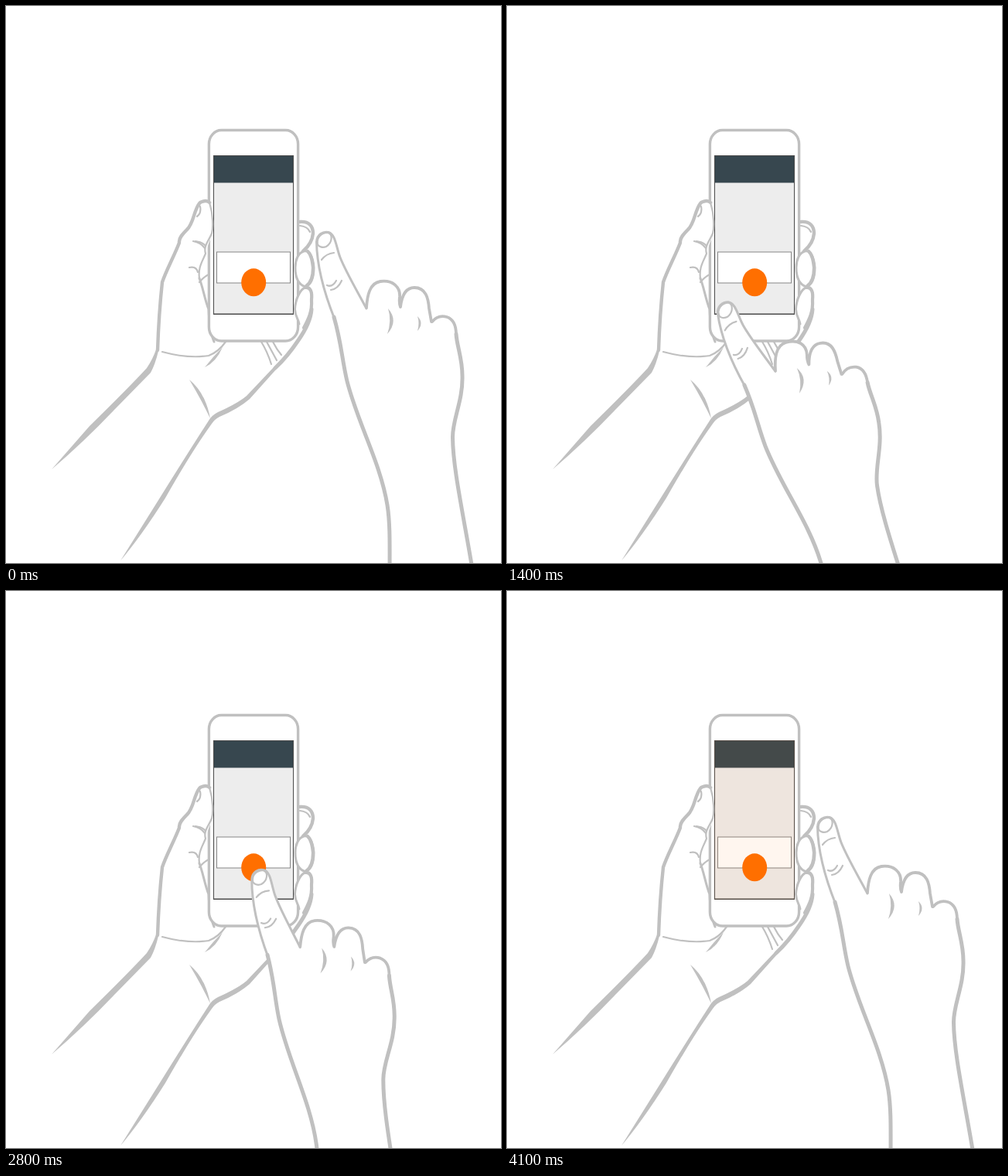
An HTML page for the animation above (4200 ms loop, 640 px wide and 720 px high).

```html
<!DOCTYPE html>
<html lang="en">
<head>
<meta charset="utf-8">
<title>Swipe and tap</title>
<style>
  html, body { margin: 0; width: 100%; height: 100%; overflow: hidden; background: #fff; }
  svg { display: block; width: 100vw; height: 100vh; }
  .line { fill: none; stroke: #c0c0c0; stroke-width: 3; stroke-linecap: round; stroke-linejoin: round; }
  .line .thin { stroke-width: 2.2; }
  .line .bold { stroke-width: 5; }
  .line .skin { fill: #fff; }
  .line .taper { fill: #c0c0c0; stroke: none; }
  .line .mask { fill: #fff; stroke: none; }
</style>
</head>
<body>
<svg viewBox="0 0 640 720">
  <defs>
    <clipPath id="screen"><rect x="268" y="193" width="104" height="206"/></clipPath>
    <g id="page">
      <rect x="268.5" y="193.5" width="103" height="205" fill="#ededed" stroke="#4a4a4a"/>
      <rect x="269" y="194" width="102" height="34.5" fill="#37474f"/>
      <rect x="272.5" y="318" width="95" height="40" fill="#fff" stroke="#858585"/>
      <ellipse cx="320.2" cy="357.3" rx="16" ry="18" fill="#ff6f00"/>
    </g>
  </defs>

  <!-- holding arm and palm -->
  <g class="line">
    <path class="taper" d="M59 599 L108 543 Q160 492 182 468 Q190 456 194 444 L197 446 Q193 463 187 474 L140 522 Q100 564 59 599Z"/>
    <path class="taper" d="M148 717 L200 634 Q240 570 262 536 Q266 529 274 525 Q299 514 311 504 L346 467 L349 470 L315 508 Q300 521 276 531 Q270 534 266 540 Q240 576 206 636 Q175 685 148 717Z"/>
    <path class="thin" d="M202 447 Q235 456 262 452 Q275 447 284 434"/>
    <path class="taper" d="M280 441 Q272 460 257 467 Q267 454 280 441Z"/>
    <path class="taper" d="M237 483 Q258 500 264 533 Q252 508 237 483Z"/>
    <path class="thin" d="M330 434 Q338 447 343 463 M337 434 Q344 447 350 458 M345 434 Q350 444 356 451"/>
    <path d="M250 352 C255 365 257 380 262 392 Q263 420 269 434"/>
    <path class="bold" d="M395 392 C394 408 385 422 378 432 Q364 453 348 468"/>
  </g>

  <!-- phone -->
  <rect x="262.4" y="160.5" width="115.2" height="272.5" rx="16" ry="18" fill="#fff" stroke="#c0c0c0" stroke-width="3.4"/>
  <g clip-path="url(#screen)">
    <rect x="268" y="193" width="104" height="206" fill="#444"/>
    <use id="current" href="#page"/>
    <use id="next" href="#page"/>
    <path d="M268 398.3H372" stroke="#4a4a4a" stroke-width="1.4"/>
    <ellipse id="ripple" cx="320.2" cy="357.3" fill="#ff6f00"/>
  </g>

  <!-- thumb and fingers around the phone -->
  <g class="line">
    <path class="mask" d="M251 254 Q258 249 263 254 Q268 275 266 296 L258 318 L240 300Z"/>
    <path stroke-width="4.4" d="M196 445 C197 415 199 385 202 357 C207 342 218 322 224 306 C223 300 229 294 234 289 C243 281 243 262 251 254 C255 252 260 251 263 254" style="stroke-width:4.4"/>
    <path class="thin" d="M247 272 C253 268 252 258 249 257 M263 254 C268 270 268 287 266 294 C262 304 255 310 258 320 C254 330 248 338 250 352"/>
    <path class="thin" d="M242 304 Q252 306 257 313 M245 304 Q254 305 258 310 M237 338 Q246 336 248 344 M250 357 Q256 350 262 347"/>
    <path style="stroke-width:4.4" d="M380 279 C392 278 397 285 397 294 C396 305 390 312 384 317"/>
    <path class="thin" d="M380 284 Q390 285 393 292"/>
    <path class="skin" d="M385 317 C378 319 374 328 374 338 C374 350 378 360 387 363 C395 360 398 350 398 338 C397 325 393 315 385 317Z"/>
    <path style="stroke-width:4.2" d="M390 317 C395 322 396 330 397 338 C397 350 394 358 388 362"/>
    <path class="mask" d="M387 364 C379 367 374 380 373 392 Q374 402 379 410 L385 417 Q395 405 395 385 Q396 365 387 364Z"/>
    <path d="M379 411 C378 404 374 402 373.5 392 C374 380 380 366 387 364"/>
    <path style="stroke-width:4.2" d="M387 364 C394 363 396 370 395 380 C396 395 391 405 385 416"/>
  </g>

  <!-- pointing hand -->
  <g id="hand" class="line">
    <path class="mask" d="M401 305 C402 295 410 291 417 292 C426 295 427 312 432 325 C440 345 455 370 466 391 C467 375 470 356 486 356 C500 355 509 364 509 390 C512 372 518 364 528 364 C544 364 546 378 549 407 C556 402 563 400 570 402 C580 406 582 415 582 425 C583 440 590 455 590 478 C591 510 577 535 577 558 C578 600 592 660 605 740 L497 740 C496 700 497 670 493 645 C484 590 455 540 441 485 C434 455 434 437 425 405 C413 375 402 340 401 305Z"/>
    <path d="M425 405 C413 375 402 340 401.5 305 C402 295 410 291 417 292.5 C426 295 427 312 432 325 C440 345 455 370 466 391"/>
    <path class="thin" d="M403 308 C401 299 408 293 416 293 C423 295 422 306 414 311 C409 313 404 311 403 308Z"/>
    <path class="bold" d="M424 402 C434 437 434 455 441 485 C455 540 484 590 493 645 C497 670 496 700 496 740"/>
    <path style="stroke-width:3.8" d="M466 390 C467 375 470 358 484 356 C500 354 510 363 509 376 Q508 384 510 389 C512 372 518 364 528 364 C543 364 546 378 547 391 L550 408"/>
    <path style="stroke-width:3.8" d="M551 408 C556 402 563 400 570 402 C579 405 582 414 582 425"/>
    <path class="bold" d="M582 424 C583 440 590 455 590 478 C591 510 577 535 577.500 558 C578 600 592 660 605 740"/>
    <path class="thin" d="M408 328 Q414 320 424 319 M415 361 Q422 364 427 355 M420 367 Q429 366 434 355"/>
    <path class="taper" d="M494 391 Q508 407 493 424 Q499 407 494 391Z"/>
    <path class="taper" d="M532 401 Q541 410 532 420 Q535 410 532 401Z"/>
  </g>
</svg>

<script>
const LOOP = 4200, STEP = 100, STRETCH = 1.125;
const $ = id => document.getElementById(id);

// time, fingertip x, fingertip y, rotation, scale
const handKeys = [
  [0, 412, 302, 0, 1],
  [100, 412, 302, 0, 1],
  [200, 393, 308, -1.3, 1],
  [400, 241, 373, -11.3, 1],
  [550, 230, 384, -12, 1],
  [700, 235, 386, -12, 1],
  [1000, 255, 387, -11.1, 1],
  [1300, 275, 391, -9, 1],
  [1800, 315, 401, -4.3, 1],
  [2250, 356, 404, -.3, 1],
  [2400, 350, 403, 0, 1],
  [2500, 343, 394, .4, 1],
  [3100, 321, 357, 2.2, 1],
  [3400, 321, 357, 2.3, .965],
  [3700, 365, 331, 1, 1],
  [4000, 412, 302, 0, 1],
  [4200, 412, 302, 0, 1]
];
// time, page shift
const pageKeys = [[0, 0], [200, 0], [400, 65], [620, 109], [LOOP, 109]];

// Smooth interpolation that never overshoots its keys
function track(keys, t) {
  const i = Math.max(1, keys.findIndex(k => k[0] > t));
  const a = keys[i - 1], b = keys[i], span = b[0] - a[0], u = (t - a[0]) / span;
  return a.slice(1).map((from, n) => {
    const slope = j => keys[j] && keys[j + 1]
      ? (keys[j + 1][n + 1] - keys[j][n + 1]) / (keys[j + 1][0] - keys[j][0]) : 0;
    const tangent = j => {
      const p = slope(j - 1), q = slope(j);
      return p * q > 0 ? 2 * p * q / (p + q) : 0;
    };
    const ease = u * u * (3 - 2 * u);
    return from + (b[n + 1] - from) * ease
      + span * u * (1 - u) * ((1 - u) * tangent(i - 1) - u * tangent(i));
  });
}

function draw(t) {
  const [x, y, angle, size] = track(handKeys, t);
  $('hand').setAttribute('transform',
    `translate(${x} ${y}) scale(1 ${STRETCH}) rotate(${angle}) scale(${size} ${size / STRETCH}) translate(-412 -302)`);

  const [shift] = track(pageKeys, t);
  $('current').setAttribute('x', -shift);
  $('next').setAttribute('x', 109 - shift);

  const radius = t > 3400 ? 16 + (t - 3400) * .287 : 0;
  $('ripple').setAttribute('rx', radius);
  $('ripple').setAttribute('ry', radius * STRETCH);
  $('ripple').setAttribute('opacity', (LOOP - t) * .00062);
}

function frame() {
  const t = Math.floor(performance.now() % LOOP / STEP) * STEP;
  draw(t < 200 ? 0 : t);
  requestAnimationFrame(frame);
}
frame();
</script>
</body>
</html>
```
